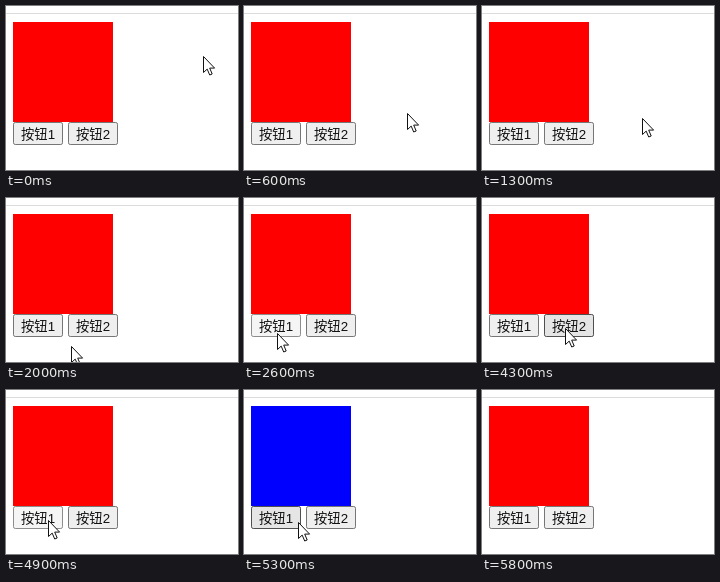
An HTML page for the animation above (6.4 s loop, 232 by 164 pixels).

```html
<!DOCTYPE html>
<html lang="zh">
<head>
<meta charset="utf-8">
<title>按钮</title>
<style>
html, body { margin: 0; width: 100%; height: 100%; overflow: hidden; background: #fff; }
svg { display: block; width: 232px; height: 164px; }
text { font: 13.333px "Liberation Sans", "Noto Sans CJK SC", "Noto Sans CJK", sans-serif; fill: #111; }
</style>
</head>
<body>
<svg viewBox="0 0 232 164">
  <rect width="232" height="164" fill="#fff"/>
  <rect y="7" width="232" height="1" fill="#dcdcdc"/>
  <rect id="box" x="7" y="16" width="100" height="100" fill="#f00"/>
  <g id="buttons"></g>
  <path id="cursor" d="M.5 .5V16.5L4.2 13.1 6.7 19 9.2 18 6.7 12.1H11.6Z"
    fill="#fff" stroke="#111" stroke-width="1"/>
</svg>
<script>
const LOOP = 6400, STEP = 100, HIDE = 5800;
const TOP = 116, WIDTH = 50, HEIGHT = 23;
const box = document.getElementById('box');
const cursor = document.getElementById('cursor');
const group = document.getElementById('buttons');

const easeOut = k => Math.sin(k * Math.PI / 2);
const easeIn = k => 1 - Math.cos(k * Math.PI / 2);

// Pointer moves: each glides to x, y along an arc that hangs down by sag
const home = { x: 197, y: 50 };
const moves = [
  { start: 0, end: 800, x: 160, y: 112, sag: 0, ease: easeOut },
  { start: 1300, end: 2600, x: 33, y: 135, sag: 27, ease: easeOut, click: true },
  { start: 3100, end: 3500, x: 45, y: 143, sag: 0, ease: easeOut },
  { start: 3700, end: 4200, x: 83, y: 130, sag: 10, ease: easeOut, click: true },
  { start: 4300, end: 4900, x: 42, y: 130, sag: 0, ease: easeOut, click: true },
  { start: 5000, end: 5600, x: 83, y: 126, sag: 3, ease: easeIn, click: true }
];
const clicks = moves.filter(m => m.click).map(m => m.end);

const looks = {
  normal: ['#efefef', '#767676'],
  hover: ['#e5e5e5', '#4f4f4f'],
  active: ['#f5f5f5', '#8d8d8d']
};

function add(tag, attrs) {
  const el = document.createElementNS('http://www.w3.org/2000/svg', tag);
  for (const key in attrs) el.setAttribute(key, attrs[key]);
  return group.appendChild(el);
}

function makeButton(x, label) {
  const rect = add('rect', { x: x + .5, y: TOP + .5, width: WIDTH - 1, height: HEIGHT - 1, rx: 1.75 });
  add('text', { x: x + 8, y: 133 }).textContent = label;
  return { x, rect };
}
const buttons = [makeButton(7, '按钮1'), makeButton(62, '按钮2')];

function pointer(t) {
  let { x, y } = home;
  for (const m of moves) {
    if (t < m.start) break;
    const k = Math.min(1, (t - m.start) / (m.end - m.start));
    const e = m.ease(k);
    x += (m.x - x) * e;
    y += (m.y - y) * e + m.sag * Math.sin(Math.PI * e ** (m.ease === easeOut ? 1 : .75));
  }
  return [Math.round(x), Math.round(y)];
}

function draw(time) {
  const t = Math.floor((time % LOOP) / STEP) * STEP;
  const [x, y] = pointer(t);
  const shown = t < HIDE;
  const pressed = clicks.includes(t);
  const released = clicks.filter(c => c < t).length;

  // Every click toggles the colour on release
  box.setAttribute('fill', released % 2 ? '#00f' : '#f00');
  for (const b of buttons) {
    const over = shown && x >= b.x && x < b.x + WIDTH && y >= TOP && y < TOP + HEIGHT;
    const [fill, stroke] = looks[!over ? 'normal' : pressed ? 'active' : 'hover'];
    b.rect.setAttribute('fill', fill);
    b.rect.setAttribute('stroke', stroke);
  }
  cursor.setAttribute('transform', `translate(${x} ${y})`);
  cursor.setAttribute('visibility', shown ? 'visible' : 'hidden');
}

const start = performance.now();
function tick() {
  draw(performance.now() - start);
  requestAnimationFrame(tick);
}
tick();
</script>
</body>
</html>
```
